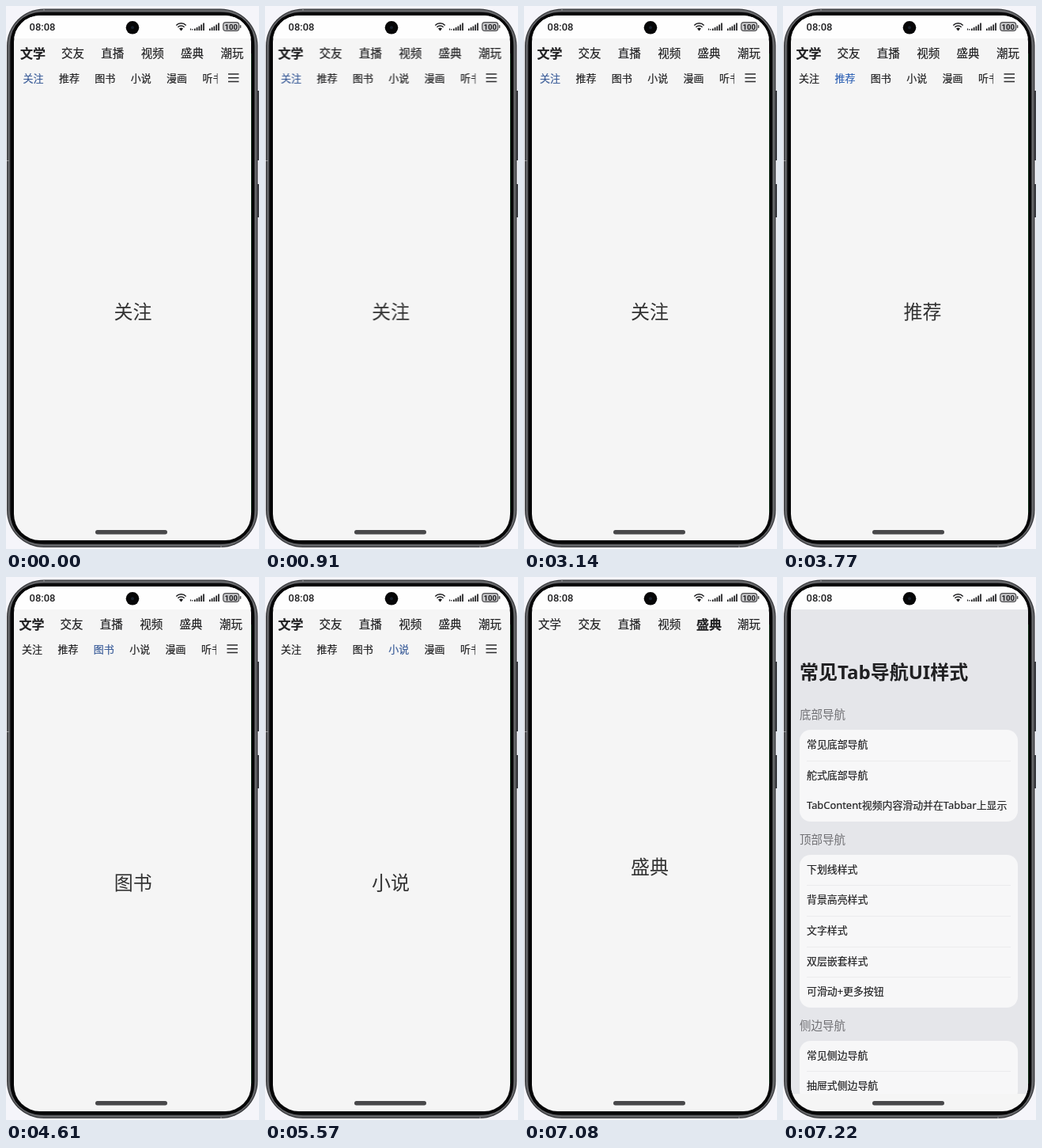
Write an HTML page that moves like this. It is 320 by 686 pixels and loops after 7290 ms.

```html
<!DOCTYPE html>
<html lang="zh-CN">
<head>
<meta charset="utf-8">
<title>Tab 导航</title>
<style>
  :root { --loop: 7290ms; --ink: #202022; --blue: #3a5c98; }
  html, body { margin: 0; width: 100%; height: 100%; overflow: hidden; background: #f5f5fa; }
  body { position: relative; font-family: Roboto, "Noto Sans CJK SC", "Noto Sans CJK", sans-serif; color: var(--ink); }
  svg { position: absolute; left: 0; top: 0; }
  .screen { position: absolute; left: 9.5px; top: 11.5px; width: 300px; height: 663.5px; border-radius: 33px; overflow: hidden; background: #f5f5f5; }
  /* children of .stage use whole-phone coordinates */
  .stage { position: absolute; left: -9.5px; top: -11.5px; width: 320px; height: 686px; }
  .stage div, .stage span { position: absolute; white-space: nowrap; }
  .layer { left: 0; top: 0; width: 320px; height: 686px; }
  .layer, .tabs span, .subs span, .track { animation: var(--loop) step-end infinite; }

  .tabs, .subs, .list li { -webkit-text-stroke: .2px; }
  .tabs span { top: 50px; width: 60px; left: calc(2.5px + var(--i) * 50.4px); font-size: 14.5px; line-height: 21px; text-align: center; }
  .subs { left: 0; top: 80px; width: 266px; height: 24px; overflow: hidden; }
  .subs span { left: calc(20px + var(--i) * 45.4px); font-size: 13px; line-height: 23px; }
  .big { width: 300px; left: calc(9px + var(--i, 0) * 301px); top: 372px; font-size: 24px; line-height: 31px; text-align: center; color: #333; }
  .main .big { top: 352px; }

  .app { animation-name: enter; animation-timing-function: ease-out; }
  .t1 { animation-name: bold1 !important; }
  .t2 { animation-name: bold2 !important; }
  .t5 { animation-name: bold5 !important; }
  .literature { animation-name: show1; }
  .friends { animation-name: show2; }
  .gala { animation-name: show5; }
  .list { animation-name: showList; }
  .track { animation-name: slide; }
  .s1 { animation-name: pick1 !important; }
  .s2 { animation-name: pick2 !important; }
  .s3 { animation-name: pick3 !important; }
  .s4 { animation-name: pick4 !important; }

  @keyframes enter { 0% { transform: translateX(1.5px); } 3.84%, 100% { transform: none; } }
  @keyframes bold1 {
    0%, 40.32% { font-weight: 700; font-size: 16px; }
    22.08%, 77.36%, 100% { font-weight: 400; font-size: 14.5px; }
  }
  @keyframes bold2 {
    0%, 40.32%, 100% { font-weight: 400; font-size: 14.5px; }
    22.08% { font-weight: 700; font-size: 16px; }
  }
  @keyframes bold5 {
    0%, 100% { font-weight: 400; font-size: 14.5px; }
    77.36% { font-weight: 700; font-size: 16px; }
  }
  @keyframes show1 { 0%, 40.32% { visibility: visible; } 22.08%, 77.36%, 100% { visibility: hidden; } }
  @keyframes show2 { 0%, 40.32%, 100% { visibility: hidden; } 22.08% { visibility: visible; } }
  @keyframes show5 { 0%, 100% { visibility: hidden; } 77.36% { visibility: visible; } }
  @keyframes showList { 0% { visibility: hidden; } 99.035%, 100% { visibility: visible; } }
  @keyframes slide {
    0% { transform: none; }
    47.49% { transform: none; animation-timing-function: cubic-bezier(.33, 1, .68, 1); }
    54.35% { transform: translateX(-301px); }
    57.61% { transform: translateX(-301px); animation-timing-function: cubic-bezier(.33, 1, .68, 1); }
    64.47% { transform: translateX(-602px); }
    67.9% { transform: translateX(-602px); animation-timing-function: cubic-bezier(.33, 1, .68, 1); }
    74.76%, 100% { transform: translateX(-903px); }
  }
  @keyframes pick1 { 0% { color: var(--blue); } 47.49%, 100% { color: var(--ink); } }
  @keyframes pick2 { 0%, 57.61%, 100% { color: var(--ink); } 47.49% { color: #3163b5; } }
  @keyframes pick3 { 0%, 67.9%, 100% { color: var(--ink); } 57.61% { color: var(--blue); } }
  @keyframes pick4 { 0%, 100% { color: var(--ink); } 67.9% { color: var(--blue); } }

  .status { left: 0; top: 0; width: 320px; height: 41px; background: #fefefe; }
  .clock { left: 29.5px; top: 16px; font-size: 13px; line-height: 21px; font-weight: 500; }

  .list { height: 653px; overflow: hidden; font-family: "Noto Sans", "Noto Sans CJK SC", "Noto Sans CJK", sans-serif; }
  .list .bg { left: 0; top: 41px; width: 320px; height: 612px; background: #e5e6ea; }
  .list h1 { position: absolute; margin: 0; left: 21px; top: 103px; font-size: 24px; line-height: 33px; white-space: nowrap; }
  .list h2 { position: absolute; margin: 0; left: 21px; font-size: 14.5px; line-height: 22px; font-weight: 400; color: #707074; }
  .list ul { position: absolute; margin: 0; padding: 0 9px; left: 21px; width: 257.5px; list-style: none; background: #f7f7f8; border-radius: 14px; }
  .list li { position: relative; height: 38.7px; line-height: 37.7px; font-size: 12.9px; white-space: nowrap; }
  .list li:not(:first-child)::before { content: ""; position: absolute; top: 0; left: 0; right: 0; height: 1px; background: #ebebed; }
  .list li.plain::before { display: none; }
</style>
</head>
<body>
<svg width="320" height="686">
  <path d="M319 107v88M319 225v42" stroke="#3a3b40" stroke-width="2"/>
  <rect x="1" y="3.5" width="317.5" height="680.5" rx="47" fill="#38393c"/>
  <rect x="3.5" y="6" width="312.5" height="675.5" rx="44.5" fill="none" stroke="#66676a" stroke-width="2.4"/>
  <rect x="5.5" y="8" width="308.5" height="671.5" rx="38" fill="#060607"/>
  <path d="M1 195.5h3M48 4v2M272 682v2" stroke="#96979a"/>
  <path d="M310 60V640" stroke="#0e421b" stroke-width="1.2"/>
</svg>

<div class="screen"><div class="stage">
  <div class="layer app">
    <div class="tabs">
      <span class="t1" style="--i:0">文学</span><span class="t2" style="--i:1">交友</span>
      <span style="--i:2">直播</span><span style="--i:3">视频</span>
      <span class="t5" style="--i:4">盛典</span><span style="--i:5">潮玩</span>
    </div>
    <div class="layer literature">
      <div class="subs">
        <span class="s1" style="--i:0">关注</span><span class="s2" style="--i:1">推荐</span>
        <span class="s3" style="--i:2">图书</span><span class="s4" style="--i:3">小说</span>
        <span style="--i:4">漫画</span><span style="--i:5">听书</span>
      </div>
      <svg width="320" height="110">
        <path d="M279.5 86h13.5m-13.5 4.8h13.5m-13.5 4.8h13.5" stroke="#2b2b2d" stroke-width="1.5"/>
      </svg>
      <div class="track">
        <div class="big" style="--i:0">关注</div><div class="big" style="--i:1">推荐</div>
        <div class="big" style="--i:2">图书</div><div class="big" style="--i:3">小说</div>
      </div>
    </div>
    <div class="layer main friends"><div class="big">交友</div></div>
    <div class="layer main gala"><div class="big">盛典</div></div>
  </div>

  <div class="layer list">
    <div class="bg"></div>
    <h1>常见Tab导航UI样式</h1>
    <h2 style="top:162px">底部导航</h2>
    <ul style="top:193px">
      <li>常见底部导航</li><li>舵式底部导航</li>
      <li class="plain">TabContent视频内容滑动并在Tabbar上显示</li>
    </ul>
    <h2 style="top:320px">顶部导航</h2>
    <ul style="top:350.5px">
      <li>下划线样式</li><li>背景高亮样式</li><li>文字样式</li><li>双层嵌套样式</li><li>可滑动+更多按钮</li>
    </ul>
    <h2 style="top:555px">侧边导航</h2>
    <ul style="top:585.5px">
      <li>常见侧边导航</li><li>抽屉式侧边导航</li>
    </ul>
  </div>

  <div class="status"><span class="clock">08:08</span></div>
  <svg width="320" height="686">
    <circle cx="160" cy="27.3" r="8.3" fill="#060607"/>
    <circle cx="160" cy="27.3" r="2" fill="#17202b"/>
    <g fill="none" stroke="#1c1c1e" stroke-width="1.5">
      <path d="M215.3 24.4a8.6 8.6 0 0 1 12.4 0M217.4 26.8a5.8 5.8 0 0 1 8.2 0"/>
      <path d="M233.5 30.5v-2M235.8 30.5v-1.6" stroke-width="1.2"/>
      <path d="M238.8 31v-2.5M241.6 31v-4M244.4 31v-5.5M247.2 31v-7.5M250 31v-9.5" stroke-width="1.7"/>
      <path d="M257.8 31v-2.5M260.6 31v-4M263.4 31v-5.5M266.2 31v-7.5M269 31v-9.5" stroke-width="1.7"/>
    </g>
    <path d="M219 28.6a3.6 3.6 0 0 1 5 0l-2.5 2.8z" fill="#1c1c1e"/>
    <rect x="274.7" y="20.7" width="20" height="10.6" rx="3.4" fill="#c9c9cb" stroke="#4a4a4c" stroke-width="1.2"/>
    <path d="M296.6 24.2v3.6" stroke="#4a4a4c" stroke-width="1.5"/>
    <text x="284.7" y="29.5" font-size="9.6" font-weight="700" text-anchor="middle" fill="#1c1c1e">100</text>
    <rect x="113" y="662" width="91" height="5.5" rx="2.7" fill="#48484a"/>
  </svg>
</div></div>
</body>
</html>
```
